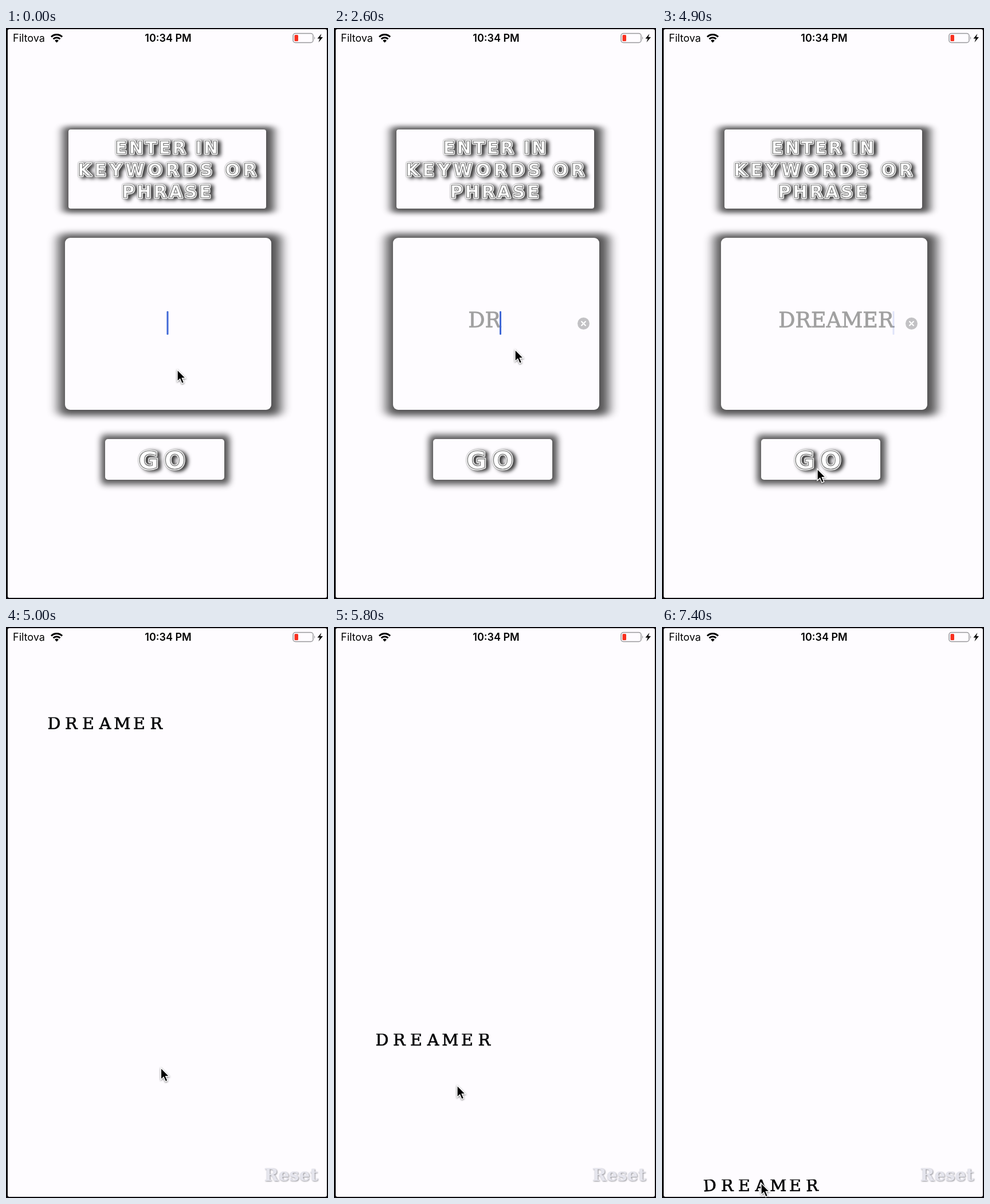
Write an HTML page that moves like this. It is 562 px wide and 996 px high and loops after 8 s.

```html
<!DOCTYPE html>
<html lang="en">
<head>
<meta charset="utf-8">
<title>Falling letters</title>
<style>
  html, body { margin: 0; height: 100%; overflow: hidden; background: #fefcff; }
  svg { display: block; width: 100vw; height: 100vh; }
  text { text-anchor: middle; }
  .status { font: 18px Inter, sans-serif; }
  .panel { fill: #fefcff; }
  .shade { opacity: .68; }
  .sign { font: bold 30px "DejaVu Sans", sans-serif; }
  .embossed { filter: drop-shadow(0 0 1px #888) drop-shadow(5px 2px 3px #000c); }
  .rim { fill: #fff; stroke: #fff; stroke-width: 4; stroke-linejoin: round; }
  .core { fill: #fff; stroke: #707070; stroke-width: 1.2; }
  .slab { font-family: "DejaVu Serif", serif; }
  #typed { font-size: 36.5px; fill: #a0a0a0; stroke: #a0a0a0; stroke-width: .8; text-anchor: end; }
  #letters { font-size: 28.5px; fill: #060608; stroke: #060608; stroke-width: .7; }
  #reset { font-size: 30px; font-weight: bold; fill: #e5e5ed;
    filter: drop-shadow(1px 1px .8px #8a8a90); }
  #pointer { filter: drop-shadow(0 1.5px 1.5px #0008); }
</style>
</head>
<body>
<svg viewBox="0 0 562 996" preserveAspectRatio="none">
  <defs>
    <filter id="blurTitle" x="-20%" y="-20%" width="140%" height="140%"><feGaussianBlur stdDeviation="8 4"/></filter>
    <filter id="blurField" x="-20%" y="-20%" width="140%" height="140%"><feGaussianBlur stdDeviation="9.5 6"/></filter>
    <filter id="blurGo" x="-20%" y="-50%" width="140%" height="200%"><feGaussianBlur stdDeviation="6"/></filter>
    <clipPath id="labelEdge"><rect x="-20" y="-20.2" width="40" height="30"/></clipPath>
    <g id="signText" class="sign">
      <text x="282" y="219" letter-spacing="3.3">ENTER IN</text>
      <text x="284" y="257.5" letter-spacing="5.9">KEYWORDS OR</text>
      <text x="282" y="296" letter-spacing="3.9">PHRASE</text>
      <text x="277" y="769" letter-spacing="10" font-size="43">GO</text>
    </g>
  </defs>
  <rect width="562" height="996" class="panel"/>

  <g id="entryPage">
    <g class="shade">
      <rect x="99" y="172" width="369" height="150" rx="6" filter="url(#blurTitle)"/>
      <rect x="91" y="359" width="389" height="317" rx="10" filter="url(#blurField)"/>
      <rect x="166" y="710" width="224" height="86" rx="6" filter="url(#blurGo)"/>
    </g>
    <g class="panel">
      <rect x="109" y="177" width="345" height="138" rx="4"/>
      <rect x="103" y="366" width="360" height="300" rx="9"/>
      <rect x="173" y="717" width="208" height="71" rx="5"/>
    </g>
    <g class="embossed">
      <use href="#signText" class="rim"/>
      <use href="#signText" class="core"/>
    </g>
    <text id="typed" class="slab" y="522"></text>
    <rect id="caret" y="494" width="3" height="41" rx="1" fill="#4068d6"/>
    <g id="clear">
      <circle cx="435.5" cy="515.5" r="10.5" fill="#c2c1c4"/>
      <path d="M431.5 511.5l8 8m0-8l-8 8" stroke="#fff" stroke-width="2.2"/>
    </g>
  </g>

  <g id="fallPage" class="slab">
    <g id="letters"></g>
    <text id="reset" x="497.5" y="966">Reset</text>
  </g>

  <g class="status">
    <text x="12" y="24" style="text-anchor: start">Filtova</text>
    <g fill="none" stroke="#000" stroke-width="3">
      <path d="M79 15.5a13.2 13.2 0 0 1 19 0M82.6 19.3a8.2 8.2 0 0 1 11.8 0"/>
      <path d="M88.5 25.5l-3.4-3.6a4.8 4.8 0 0 1 6.8 0z" fill="#000" stroke="none"/>
    </g>
    <text x="283" y="24" font-weight="600">10:34 PM</text>
    <rect x="501" y="9.5" width="35" height="16" rx="4" fill="none" stroke="#98979b" stroke-width="1.5"/>
    <path d="M538 14.5q2.5 3 0 6z" fill="#98979b"/>
    <rect x="503.5" y="12" width="6.5" height="11" rx="1.5" fill="#f8301f"/>
    <path d="M550.5 10l-7 8.4h4.2l-2.2 6.6 7.5-9h-4.4z"/>
  </g>

  <path fill="#0b090d" fill-rule="evenodd"
    d="M0 0H562V996H0zM6 2Q3 2 3 5V991Q3 994 6 994H557Q560 994 560 991V5Q560 2 557 2z"/>
  <path id="pointer" d="M0 0V20.5L4.7 16.2L8 24L11.7 22.4L8.4 14.8H14.6Z" stroke="#fff" stroke-width="1.4"/>
</svg>
<script>
const LOOP = 8000, PAGE_SWAP = 5000;
const el = id => document.getElementById(id);
const clamp = v => Math.max(0, Math.min(1, v));

// time, text, caret centre
const keystrokes = [
  [-300, "", 282], [700, "D", 277], [900, "Dr", 285.5], [1000, "Dre", 302.5],
  [1300, "Drem", 335.5], [1800, "Dre", 302.5], [2000, "Dr", 285.5], [2200, "D", 277],
  [2600, "DR", 290.5], [2700, "DRE", 312.5], [2900, "DREA", 342], [3000, "DREAM", 380],
  [3200, "DREAME", 392], [3300, "DREAMER", 404]
];

// time, x, y of the pointer tip
const pointerStops = [
  [0, 299, 596], [500, 316, 561], [3500, 316, 561], [4100, 272, 780], [4200, 272, 780],
  [4500, 271, 769], [4950, 271, 769], [5400, 252, 766], [5700, 222, 790],
  [6300, 128, 918], [6550, 167, 957], [7100, 173, 969], [7200, 173, 969], [7400, 173, 970]
];

const START_Y = 175, FLOOR_Y = 984, GRAVITY = 1500, DROP_TIME = 4941;
const FALL = Math.sqrt(2 * (FLOOR_Y - START_Y) / GRAVITY);
const bounciness = [.196, .202, .188, .192, .19, .19, .191];
const restTilt = [-3, 0, 0, 0, 0, 0, -2];

const letters = [..."DREAMER"].map(char => {
  const group = document.createElementNS("http://www.w3.org/2000/svg", "g");
  group.innerHTML = `<text clip-path="url(#labelEdge)">${char}</text>`;
  return el("letters").appendChild(group);
});

function letterY(seconds, bounce) {
  if (seconds < FALL) return START_Y + GRAVITY * seconds ** 2 / 2;
  let speed = GRAVITY * FALL, air = seconds - FALL;
  for (let i = 0; i < 3; i++) {
    speed *= bounce;
    const flight = 2 * speed / GRAVITY;
    if (air < flight) return FLOOR_Y - speed * air + GRAVITY * air ** 2 / 2;
    air -= flight;
  }
  return FLOOR_Y;
}

function pointerAt(t) {
  const next = pointerStops.findIndex(stop => stop[0] > t);
  if (next < 0) return pointerStops.at(-1).slice(1);
  const [t0, x0, y0] = pointerStops[next - 1], [t1, x1, y1] = pointerStops[next];
  const p = (t - t0) / (t1 - t0), eased = p * p * (3 - 2 * p);
  return [x0 + (x1 - x0) * eased, y0 + (y1 - y0) * eased];
}

function caretOpacity(idle) {
  const phase = idle % 1000;
  if (phase >= 500) return 1 - clamp((phase - 500) / 120);
  return idle < 1000 ? 1 : clamp(phase / 120);
}

function drawEntry(t) {
  const [time, text, caretX] = keystrokes.findLast(key => key[0] <= t);
  el("typed").textContent = text;
  el("typed").setAttribute("x", caretX + .5);
  el("caret").setAttribute("x", caretX - 1.5);
  el("caret").setAttribute("opacity", caretOpacity(t - time));
  el("clear").style.display = text ? "" : "none";
}

function drawFall(t) {
  const seconds = (t - DROP_TIME) / 1000;
  letters.forEach((letter, i) => {
    const tilt = restTilt[i] * clamp((seconds - FALL) / .5);
    letter.setAttribute("transform",
      `translate(${84 + 29.7 * i} ${letterY(seconds, bounciness[i])}) rotate(${tilt})`);
  });
}

function frame(now) {
  const t = now % LOOP, falling = t >= PAGE_SWAP;
  el("entryPage").style.display = falling ? "none" : "";
  el("fallPage").style.display = falling ? "" : "none";
  if (falling) drawFall(t); else drawEntry(t);
  el("pointer").setAttribute("transform", `translate(${pointerAt(t)})`);
  requestAnimationFrame(frame);
}
frame(performance.now());
</script>
</body>
</html>
```
